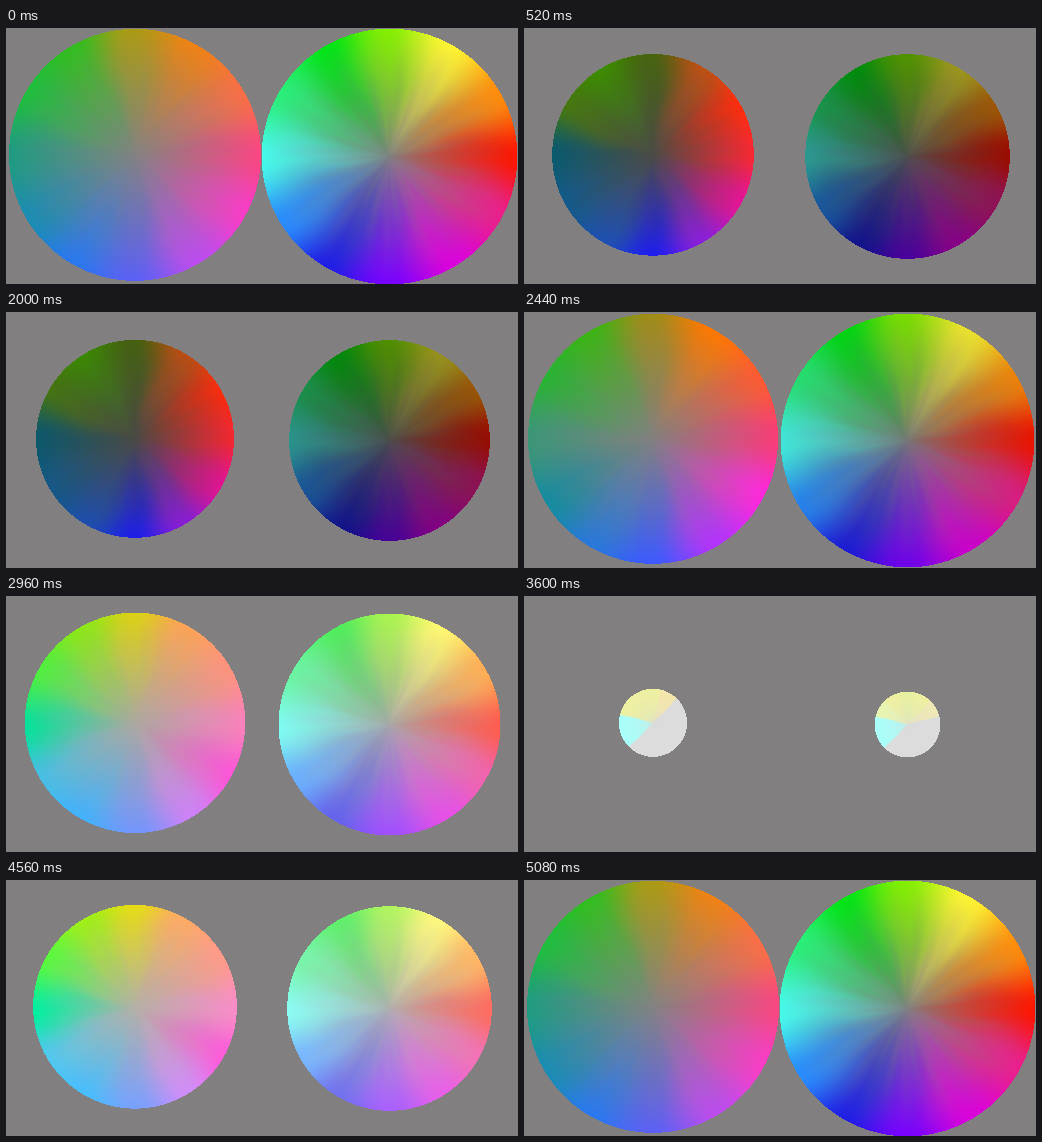
These frames come from a looping animation (512 px wide and 256 px high, 5.12 s). An HTML page with a canvas:

```html
<!DOCTYPE html>
<html lang="en">
<head>
<meta charset="utf-8">
<title>Colour ball slices</title>
<style>
  html, body { margin: 0; width: 100%; height: 100%; overflow: hidden; background: #827f81; }
  canvas { display: block; width: 100%; height: 100%; image-rendering: pixelated; }
</style>
</head>
<body>
<canvas id="stage" width="512" height="256"></canvas>
<script>
const LOOP = 5120, STEP = 40, FRAMES = LOOP / STEP, TAU = Math.PI * 2;
const CAP = 0.965;
const canvas = document.getElementById('stage');
const ctx = canvas.getContext('2d');

const mix = (a, b, t) => a + (b - a) * t;
const ease = t => t * t * (3 - 2 * t);
const clamp = (v, lo, hi) => Math.min(hi, Math.max(lo, v));
const rgb = hex => [0, 2, 4].map(i => parseInt(hex.slice(i, i + 2), 16));

// A slice has a height, a centre colour and rim colours every 30 degrees from the right, anticlockwise.
const slice = (z, core, rim) => ({ z, core: rgb(core), rim: rim.split(' ').map(rgb) });

function shade(s, z, fn) {
  return { z, core: s.core.map(fn), rim: s.rim.map(c => c.map(fn)) };
}

const left = [
  slice(-CAP, '2c2e34', 'a80c14 961405 502314 2d2823 283037 28323a 283038 26303a 14284c 00288c 46006e 960a3c'),
  slice(-0.6, '4b4b46', 'fa2832 ff2d0e be5014 46640f 3c8c00 46780f 0a5a6e 145a8c 1e50b4 1e1ef0 8c1edc e61496'),
  slice(-0.12, '828080', 'fa3c78 ff5a32 ff7800 a08c18 3cb414 28b432 3c9678 148ca0 2878dc 3c5aff b432ff ff28dc'),
  slice(0, '828282', 'fa4682 fa6e46 f08214 aa9b14 32be1e 1ebe3c 1e9b82 198cb4 2878f0 5a60f5 be4bf0 fa3cc8'),
  slice(0.6, 'b4b0a6', 'fa8cc8 ff9a88 ffaa64 e6dc14 a0f014 5afa3c 00f0a0 50c8f0 46beff 78a0ff d28cfa ff5adc'),
  slice(CAP, 'd8dcd8', 'dcdcdc dcdcdc f5e6aa eef0a0 eef0a0 eef0a0 a8fffa a8fffa dcdcdc dcdcdc dcdcdc dcdcdc')
];

const middle = slice(0, '808080',
  'ff1400 ff8c0a fff532 82f000 00e614 28f078 46faeb 288cff 1e1ee6 7800ff dc00dc eb1e8c');
const right = [
  slice(-CAP, '2c3036', '46080a 502808 3c4600 374b00 304600 2c3830 28323a 202c40 081450 0c0a46 3c0046 500040'),
  shade(middle, -0.6, v => v * 0.61),
  middle,
  shade(middle, 0.6, v => 255 - (255 - v) * 0.63),
  slice(CAP, 'd8dcd8', 'dcdcdc f0e8b4 eef0a0 e8f0a0 eef0a0 e8f5b0 a8fffa a8fffa dcdcdc dcdcdc dcdcdc dcdcdc')
];

const balls = [
  { x: 129, y: 126.8, slices: left, streak: 0.05, power: 1, radius: (c, z) => 126 * c + 1.7 * Math.max(0, z) },
  { x: 383.5, y: 128.5, slices: right, streak: 0.09, power: 0.82, radius: c => 127.8 * c }
];

// Colours of one cross-section: its core and a rim table per degree.
function section(slices, z) {
  const h = clamp(z, -CAP, CAP);
  let i = 0;
  while (i < slices.length - 2 && h > slices[i + 1].z) i++;
  const a = slices[i], b = slices[i + 1];
  const t = (h - a.z) / (b.z - a.z);
  const blend = (p, q) => p.map((v, n) => mix(v, q[n], t));
  const keys = a.rim.map((c, n) => blend(c, b.rim[n]));
  const sharp = 1 + 5 * clamp((z - 0.65) / 0.3, 0, 1);
  const rim = new Float32Array(360 * 3);
  for (let d = 0; d < 360; d++) {
    const n = Math.floor(d / 30);
    const f = ease(clamp((d % 30 / 30 - 0.5) * sharp + 0.5, 0, 1));
    for (let j = 0; j < 3; j++) rim[d * 3 + j] = mix(keys[n][j], keys[(n + 1) % 12][j], f);
  }
  return { core: blend(a.core, b.core), rim };
}

function drawBall(px, ball, angle) {
  const z = -Math.sin(angle);
  const r = ball.radius(Math.abs(Math.cos(angle)), z);
  const { core, rim } = section(ball.slices, z);
  const power = mix(ball.power, 0.3, clamp((z - 0.6) / 0.36, 0, 1));
  const calm = Math.min(1, 2.2 * Math.abs(Math.cos(angle)));
  const top = Math.max(0, Math.floor(ball.y - r)), bottom = Math.min(255, Math.ceil(ball.y + r));
  const start = Math.max(0, Math.floor(ball.x - r)), end = Math.min(511, Math.ceil(ball.x + r));
  for (let y = top; y <= bottom; y++) {
    for (let x = start; x <= end; x++) {
      const dx = (x + 0.5 - ball.x) / r, dy = (ball.y - y - 0.5) / r;
      const q = Math.sqrt(dx * dx + dy * dy);
      if (q > 1) continue;
      const a = Math.atan2(dy, dx);
      // Gentle bends and radial streaks
      const bend = 0.06 * calm * Math.sin(7 * q + 3 * a + 2 * z) * (1 - q * 0.6);
      const ray = Math.sin(19 * a + 4 * q) + Math.sin(31 * a - 5 * q + 1);
      const amount = Math.pow(clamp(q * (1 + ball.streak * calm * ray * (1 - q)), 0, 1), power);
      const d = Math.floor(((a + bend) / TAU + 2) * 360) % 360 * 3;
      const o = (y * 512 + x) * 4;
      for (let j = 0; j < 3; j++) px[o + j] = mix(core[j], rim[d + j], amount);
    }
  }
}

const image = ctx.createImageData(512, 256);
const pixels = new Uint32Array(image.data.buffer);
let shown = -1;

function render(time) {
  const step = Math.floor((time % LOOP) / STEP);
  if (step === shown) return;
  shown = step;
  pixels.fill(0xff817f82);
  const angle = TAU * step / (FRAMES - 1);
  balls.forEach(ball => drawBall(image.data, ball, angle));
  ctx.putImageData(image, 0, 0);
}

const begin = performance.now();
function tick() {
  render(performance.now() - begin);
  requestAnimationFrame(tick);
}
tick();
</script>
</body>
</html>
```
